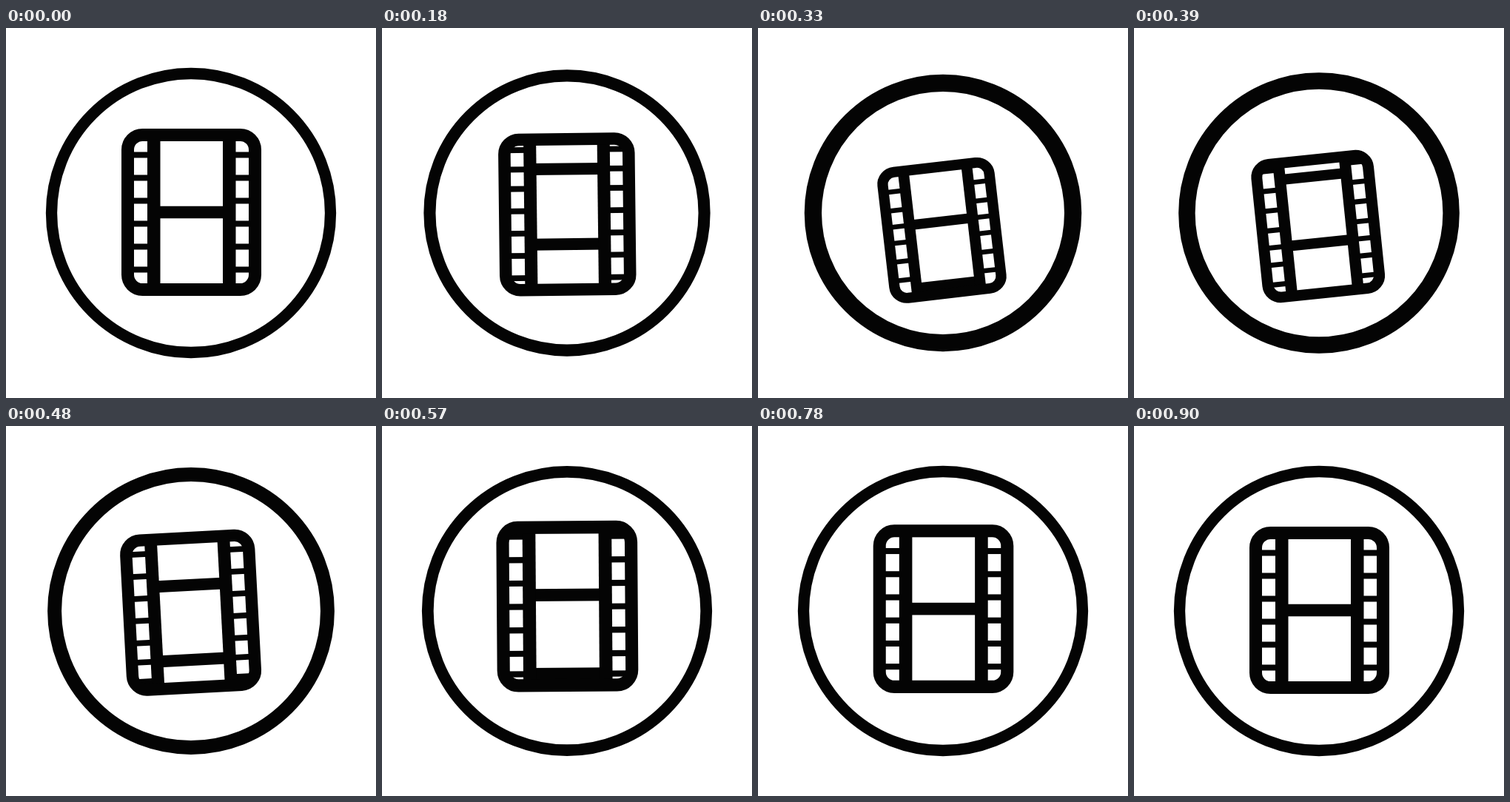
These frames come from a looping animation (500x500 px, 1.08 s). An HTML page with a canvas:

```html
<!DOCTYPE html>
<html lang="en">
<head>
<meta charset="utf-8">
<title>Film strip icon</title>
<style>
  html, body { margin: 0; width: 100%; height: 100%; overflow: hidden; background: #fff; }
  canvas { display: block; width: 100%; height: 100%; }
</style>
</head>
<body>
<canvas id="stage" width="500" height="500"></canvas>
<script>
const ctx = document.getElementById('stage').getContext('2d');
const INK = '#040404';
const STEP = 30, STEPS = 36, START = 4.7;
const W = 172, H = 209, TICK_GAP = 31;

const clamp = u => Math.min(1, Math.max(0, u));
const ease = u => (1 - Math.cos(Math.PI * clamp(u))) / 2;

// Rises from 0 to 1 at peak and falls back to 0 at end.
function pulse(k, start, peak, end) {
  return k < peak ? ease((k - start) / (peak - start)) : ease((end - k) / (end - peak));
}

// Two panels pass by: a sudden start, then a long slow-down.
function rollAt(k) {
  const s = Math.cbrt(clamp((k - 5.86) / 18.9));
  return 2 * H * (s * s * (3 - 2 * s) - 1);
}

function line(x, y, w, h) {
  ctx.fillRect(x, y - h / 2, w, h);
}

function ticks(y) {
  line(-W / 2, y, 36, 8);
  line(W / 2 - 36, y, 36, 8);
}

function drawPanel(y) {
  line(-51, y, 102, 16.5);
  line(-51, y + H / 2, 102, 16.5);
  for (let i = -2.5; i < 3; i++) ticks(y + i * TICK_GAP);
  ticks(y + H / 2);
}

function drawFilm(roll) {
  ctx.beginPath();
  ctx.roundRect(-W / 2, -H / 2, W, H, 20);
  ctx.save();
  ctx.clip();
  for (let y = roll % H - H; y <= H; y += H) drawPanel(y);
  for (const x of [-59.5, 42.5]) line(x, 0, 17.5, H);
  ctx.restore();
  ctx.lineWidth = 17;
  ctx.stroke();
}

function draw(k) {
  const moving = k > 5;
  const dip = moving ? pulse(k, START, 9, 20) : 0;
  const squash = moving ? pulse(k, START, 9.9, 19) : 0;
  const drop = moving ? pulse(k, START, 10.6, 18.8) : 0;
  const swing = moving ? pulse(k, START, 11, 20.5) : 0;
  const rebound = pulse(k, 11, 20, 30);

  ctx.fillStyle = '#fff';
  ctx.fillRect(0, 0, 500, 500);
  ctx.fillStyle = ctx.strokeStyle = INK;

  ctx.beginPath();
  ctx.arc(250, 250, 188.5 - 14 * dip, 0, Math.PI * 2);
  ctx.lineWidth = 15.3 + 8 * swing;
  ctx.stroke();

  ctx.save();
  ctx.translate(250.5 - 2 * swing, 249 + 24.5 * drop - 5.5 * rebound);
  ctx.rotate(-6.6 * swing * Math.PI / 180);
  ctx.scale(1 - 0.163 * squash + 0.009 * rebound, 1 - 0.188 * squash + 0.022 * rebound);
  drawFilm(rollAt(k));
  ctx.restore();
}

const begin = performance.now();
function tick() {
  draw(Math.floor((performance.now() - begin) / STEP) % STEPS);
  requestAnimationFrame(tick);
}
tick();
</script>
</body>
</html>
```
